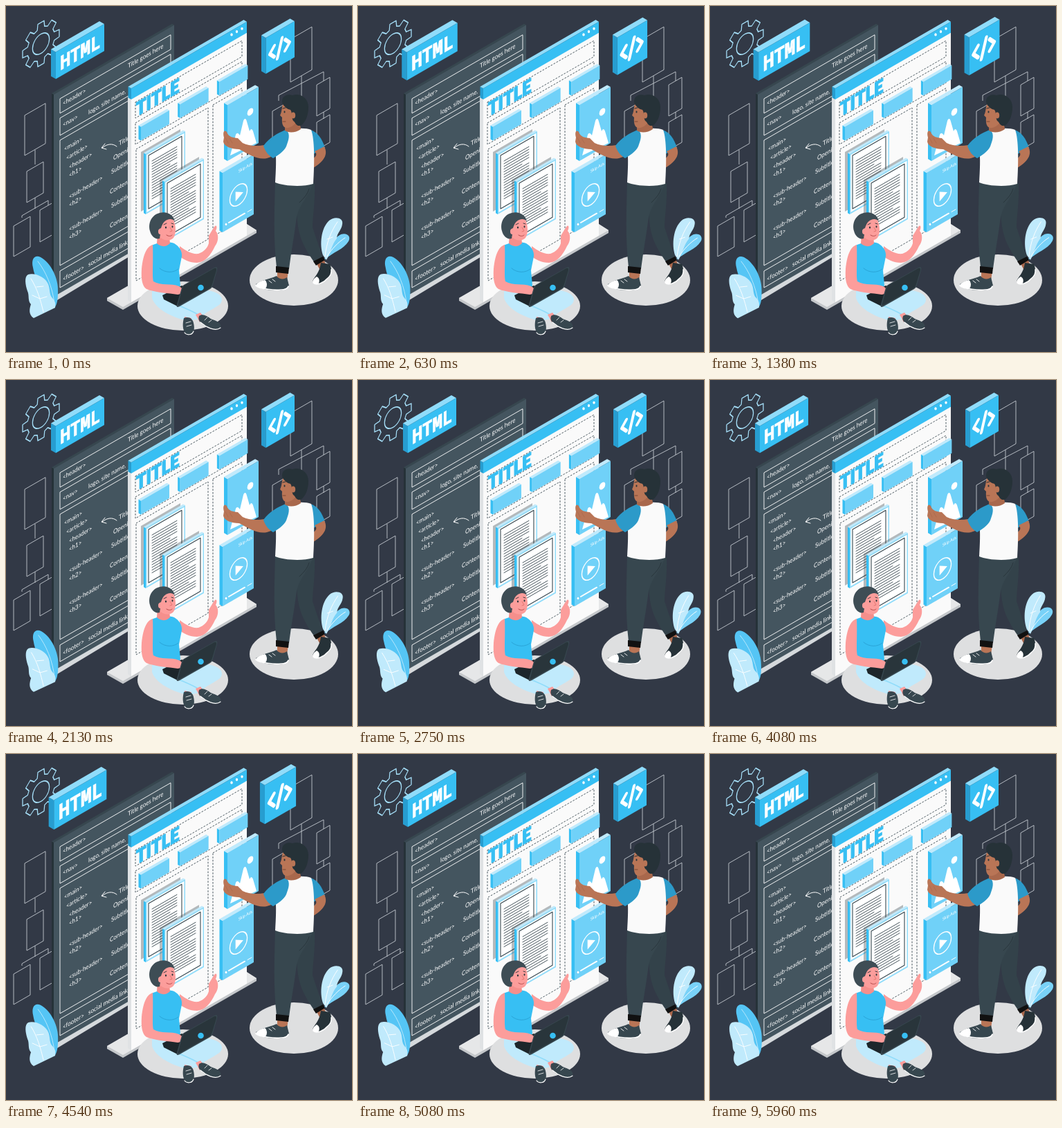
These frames come from a looping animation (500x500 px, 6 s). An HTML page:

```html
<!DOCTYPE html>
<html lang="en">
<head>
<meta charset="utf-8">
<title>Web page planning</title>
<style>
  html, body { margin: 0; width: 100%; height: 100%; overflow: hidden; background: #323946; }
  svg { display: block; width: 100vw; height: 100vh; }
  .note { font: 9.2px Lato, "Open Sans", sans-serif; fill: #fff; }
  .wire { fill: none; stroke: #c3c9d0; stroke-width: .9; }
  .white { fill: none; stroke: #fff; stroke-width: 1; }
  .dash { fill: none; stroke: #37474f; stroke-width: .9; stroke-dasharray: 2.6 2; }
</style>
</head>
<body>
<svg id="stage" viewBox="0 0 500 500"></svg>
<script>
const stage = document.getElementById('stage');
const S = .577;
const BLUE = '#37bff3', SKY = '#70d1f8', PALE = '#90dcfa', DEEP = '#279dd0', ICE = '#c0eafc';
const INK = '#263238', SLATE = '#37474f', PINK = '#fc9d9b', BROWN = '#b97556';

const path = (d, fill, extra = '') => `<path d="${d}" fill="${fill}" ${extra}/>`;
const line = (d, cls, extra = '') => `<path d="${d}" class="${cls}" ${extra}/>`;
const stroke = (d, color, w = 1) =>
  `<path d="${d}" fill="none" stroke="${color}" stroke-width="${w}" stroke-linecap="round" stroke-linejoin="round"/>`;
const ellipse = (x, y, rx, ry, fill) => `<ellipse cx="${x}" cy="${y}" rx="${rx}" ry="${ry}" fill="${fill}"/>`;

// Isometric wall: x runs up to the right, y straight down
const iso = (x, y, inner) => `<g transform="matrix(.866 -.5 0 1 ${x} ${y})">${inner}</g>`;
const quad = (x, y, w, h) => `M${x} ${y}l${w} ${-w * S}v${h}l${-w} ${w * S}z`;
const note = (x, y, s, size = 9.2) => iso(x, y, `<text class="note" style="font-size:${size}px">${s}</text>`);
const box = (x, y, w, h, d, face = BLUE, side = DEEP, top = PALE) =>
  path(`M${x} ${y}l${-d} ${-d * S}v${h}l${d} ${d * S}z`, side) +
  path(`M${x} ${y}l${w} ${-w * S}l${-d} ${-d * S}l${-w} ${w * S}z`, top) +
  path(quad(x, y, w, h), face);

function gear() {
  let d = '';
  for (let i = 0; i < 8; i++) {
    [[-.27, 23], [-.17, 31], [.17, 31], [.27, 23]].forEach(([a, r], k) => {
      const q = i * Math.PI / 4 + a;
      d += `${i || k ? 'L' : 'M'}${(r * Math.sin(q)).toFixed(1)} ${(r * Math.cos(q)).toFixed(1)}`;
    });
  }
  return iso(50.5, 54.5, stroke(d + 'Z', '#a5def7', 1.5) +
    '<circle r="14" fill="none" stroke="#a5def7" stroke-width="1.5"/>');
}

function wires() {
  return line(quad(27, 158, 30, 58) + 'M42 208v21' + quad(30, 239, 24, 45) +
    'M42 277v16M23 306v-3l38 -22v7' + quad(11, 318, 24, 44) + quad(49, 295, 24, 46) +
    quad(411, 48, 31, 62) + 'M427 101v29M394 137v-8l65 -34v13' + quad(449, 114, 19, 45) +
    'M459 153v10' + quad(449, 168, 19, 40) + quad(385, 152, 19, 43), 'wire');
}

function codePanel() {
  const notes = [
    [82, 144, '&lt;header&gt;'], [176, 90, 'Title goes here'], [82, 175, '&lt;nav&gt;'],
    [119, 157, 'logo, site name,'], [84, 210, '&lt;main&gt;'], [87, 223, '&lt;article&gt;'],
    [91, 236, '&lt;header&gt;'], [91, 248, '&lt;h1&gt;'], [91, 279, '&lt;sub-header&gt;'],
    [91, 291, '&lt;h2&gt;'], [91, 326, '&lt;sub-header&gt;'], [91, 338, '&lt;h3&gt;'],
    [163, 202, 'Title'], [155, 223, 'Opening'], [152, 243, 'Subtitle'], [150, 272, 'Content'],
    [152, 292, 'Subtitle'], [150, 321, 'Content'], [82, 398, '&lt;footer&gt;'],
    [119, 377, 'social media links']
  ];
  const frames = [[134, 21], [162, 25], [194, 181], [383, 24]];
  return path('M66 418L180 353v8L69 428L66 426z', '#d5d9dc') +
    box(69, 128, 174, 292, 3, '#44555f', INK, SLATE) +
    line(frames.map(([y, h]) => quad(78, y, 160, h)).join(''), 'white', 'stroke-opacity=".9"') +
    notes.map(n => note(...n)).join('') +
    stroke('M160 203C154 198 146 199 139 205M143 199L138 205L145 207', '#fff');
}

function paper(x, y) {
  let rows = '';
  for (let i = 0; i < 15; i++) {
    const w = i % 6 == 5 ? 26 : 36;
    rows += `M${x + 9} ${y + 10 + i * 3.9}l${w} ${-w * S}`;
  }
  return path(quad(x - 7, y - 3, 57, 86), '#37474f', 'opacity=".36"') +
    box(x, y, 57, 87, 3, PALE, BLUE, ICE) +
    path(quad(x + 1.5, y + 1, 54, 83), '#fff') +
    stroke(quad(x + 4, y + 2, 48, 77), SLATE, 1.1) +
    stroke(rows, SLATE, .9);
}

function pagePanel() {
  const dashes = quad(187, 139, 154, 23) + quad(187, 169, 154, 31) +
    quad(188, 207, 104, 190) + quad(299, 143, 42, 190);
  return path('M146 422L340 310L362 324v4L169 439L146 426z', '#c4c7ca') +
    path('M146 422L340 310L362 324L169 435z', '#e6e7e8') +
    box(181, 134, 167, 294, 5, '#fafafa', '#dfe2e4', '#fff') +
    box(181, 119, 167, 16, 4.5) +
    [326, 333.5, 341].map(x => ellipse(x, 154 - x * S + 75.5, 1.7, 2.1, '#fff')).join('') +
    line(dashes, 'dash') +
    iso(188, 160, `<text style="font:900 27.5px Lato,sans-serif" fill="${BLUE}" stroke="${BLUE}" stroke-width="1.4">TITLE</text>`) +
    [0, 1, 2].map(i => box(195 + i * 56.7, 174.5 - i * 32.5, 41, 20, 3.5, SKY, BLUE, ICE)).join('') +
    paper(202, 214) + paper(229, 254) + photo() + video();
}

function photo() {
  return box(320, 143, 45, 81, 5, SKY, BLUE, ICE) +
    path('M324 216L332 186C334 182 336 184 338 187L343 166C345 161 347 163 348 167L352 181C354 176 356 178 357 181L362 198Z', '#fff') +
    iso(353, 153, '<circle r="5" fill="#fff"/>');
}

function video() {
  return box(313, 241, 45, 86, 4.5, SKY, BLUE, ICE) +
    note(336, 241, 'Skip Ads', 6.2) +
    iso(336, 273, '<circle r="14.5" fill="none" stroke="#fff" stroke-width="1.5"/><path d="M-5-7L8 0L-5 7z" fill="#fff"/>') +
    stroke('M322 313L345 299.7', '#fff', 2) + ellipse(318, 315.5, 1.4, 1.7, '#fff') +
    stroke('M349 297.5L355 294', '#fff', 1);
}

function signs() {
  return `<g class="beat" data-at="103.5 63">${box(72, 66.5, 70, 39, 7)}` +
    iso(78.5, 93, '<text style="font:700 28px \'Noto Sans Mono\',monospace" fill="#fff" stroke="#fff" stroke-width=".7">HTML</text>') + '</g>' +
    `<g class="beat" data-at="393 59">${box(375.5, 46, 41.5, 52, 6.5)}` +
    iso(395.5, 61, stroke('M-9-8L-16.5 0L-9 8M4-13L-4 13M9-8L16.5 0L9 8', '#fff', 5)) + '</g>';
}

function plants() {
  return '<g class="wind" data-at="54 448">' +
    path('M71 435C62 420 43 402 39 378C36 366 41 359 50 363C65 371 76 394 75 412C75 424 74 430 71 435Z', '#55c5f5') +
    stroke('M46 369C57 383 67 405 70 430', ICE, .9) +
    path('M40 451C32 446 34 437 36 431C31 426 34 418 31 412C28 403 26 391 32 388C42 385 57 392 61 402C64 409 62 417 67 422C73 428 71 434 71 436Z', ICE) +
    stroke('M36 394C45 408 50 425 54 442M44 406L54 405M38 418L49 423L59 420', '#fff', .9) + '</g>' +
    '<g class="wind" data-at="463 367">' +
    path('M460 367C465 348 474 335 484 330C493 327 499 333 495 340C488 352 473 355 460 367Z', '#79d2f8') +
    path('M458 360C453 345 455 321 467 310C475 303 488 306 486 315C485 324 478 328 478 336C471 344 469 357 463 367Z', ICE) +
    stroke('M479 312C470 325 463 342 461 362M464 337L472 334M490 335C480 341 470 352 464 362', '#fff', .9) + '</g>';
}

function woman() {
  const hair = '#3e4d55';
  return ellipse(255.5, 433.5, 65.5, 35.5, '#dedfe0') +
    path('M251 347C260 354 269 359 278 358C286 355 291 350 293 343L293 332L301 319C304 315 306 319 303 325C308 330 307 341 302 347C296 360 288 370 276 371C265 371 256 366 251 362Z', PINK) +
    path('M211 406C230 412 280 406 300 413C313 417 315 426 308 432C296 440 285 444 280 452L262 455C240 450 216 438 211 422Z', ICE) +
    stroke('M250 433C262 438 272 442 279 447', PALE, 1.5) +
    path('M274 446L281 443L288 452L280 457ZM258 449L268 451L267 457H258Z', PINK) +
    path('M257 451C264 448 270 452 271 458C273 466 272 474 265 475C256 474 254 463 257 451Z', SLATE) +
    path('M279 448C284 444 290 448 296 452C304 455 312 458 310 464C306 470 298 468 290 464C284 460 276 456 279 448Z', SLATE) +
    stroke('M258 472C261 476 269 476 271 470M281 457C289 464 302 471 310 465', '#fff', 1.2) +
    stroke('M260 458L267 456M261 463L268 461M287 454L291 450M293 457L297 454', '#fff', .8) +
    path('M211 346C220 341 236 340 243 343C250 347 255 354 254 362L250 382C251 395 253 405 251 410C238 414 222 412 210 408C213 390 208 365 211 346Z', BLUE) +
    stroke('M222 379C230 386 242 386 249 380', DEEP, .8) +
    path('M219 329L236 333L237 343C231 349 223 348 218 343Z', '#f58f8c') +
    path('M220 316C225 306 237 304 242 309C246 318 246 329 242 335C236 341 227 339 221 333Z', PINK) +
    path('M244 311C242 301 232 296 222 299C210 302 205 314 208 325C210 333 216 338 222 336L223 330C219 327 220 322 224 321C226 315 228 311 233 309C237 307 241 308 244 311Z', hair) +
    ellipse(223, 326, 3, 4, PINK) +
    ellipse(231, 320, 1.1, 1.5, INK) + ellipse(240.5, 319, 1, 1.4, INK) +
    stroke('M228 316L232 314M239 314L242 315', INK, .9) + stroke('M237 320L240 325L237 326', '#e0736d', .9) +
    stroke('M232 331C235 333 238 333 240 331', '#b34a4a', 1) +
    path('M226 418L254 404L262 408L248 434L228 424Z', '#1d262b') +
    path('M212 345C202 348 198 362 196 380C195 395 197 405 203 409C215 414 235 415 248 417C258 416 258 409 250 405C238 400 224 405 213 398C211 390 213 370 212 345Z', PINK) +
    path('M257 403L301 378C305 376 306 378 305 382L299 403Q298 407 295 409L251 434C247 436 246 435 247 431L254 407Q255 404 257 403Z', SLATE) +
    path('M257 404L301 379C304 378 304 379 304 382L298 402Q297 406 294 408L253 431C249 433 248 433 249 430L255 408Z', '#29353b') +
    ellipse(281.5, 407, 4.3, 4.3, BLUE);
}

function man() {
  const sleeve = '#2c9ac9', shade = '#a9684c';
  return path('M440 179C450 182 457 192 461 205L444 214Z', sleeve) +
    path('M460 203C465 213 462 223 444 234L442 222C449 217 450 214 446 210Z', BROWN) +
    path('M446 367L458 363L464 378L454 382Z', shade) +
    path('M455 371L468 373C472 382 470 390 463 395C457 402 447 404 443 399C443 393 453 388 455 371Z', INK) +
    path('M443 399C443 396 446 393 449 391C453 393 454 398 451 402C447 403 444 402 443 399Z', '#fff') +
    stroke('M444 400C450 404 459 400 464 394C469 390 471 386 470 381', '#fff', 1.5) +
    path('M416 255L446 256C447 285 443 304 443 320L458 364L446 371C435 355 423 338 421 310Z', '#33424a') +
    path('M444 369L458 362L461 367L448 375Z', '#111') +
    path('M392 381L408 382L406 397L392 396Z', BROWN) +
    path('M361 402C369 396 383 394 391 390C394 395 402 396 406 392L409 404C404 411 396 411 388 411C376 410 364 409 361 402Z', SLATE) +
    path('M361 403C364 399 369 397 374 396C378 399 378 406 374 409C368 408 362 407 361 403Z', '#fff') +
    stroke('M361 404C367 409 389 411 397 410C403 410 407 408 408 405', '#fff', 1.7) +
    stroke('M380 397L384 400M385 395L389 398', '#fff', .9) +
    path('M389 252L444 255C438 275 424 286 420 305C417 330 412 355 409 380L391 378C386 335 388 295 389 252Z', SLATE) +
    stroke('M424 284C430 278 436 272 438 264', INK, .8) +
    path('M390 376L409 378L408 387L390 385Z', '#111') +
    path('M404 180C416 176 434 176 441 179C446 192 446 225 444 257C428 262 400 260 389 255C390 238 391 220 389 205Z', '#fafafa') +
    path('M373 201C362 203 350 202 342 198L335 191C328 190 322 190 319 182C315 178 313 183 315 190L314 196C315 203 326 207 337 207C348 213 364 223 377 220L386 217Z', BROWN) +
    stroke('M317 190L321 198M323 191L327 198', shade, .7) +
    path('M404 179C392 184 381 190 372 202C375 212 381 217 386 220C396 214 404 208 406 200C410 190 410 182 404 179Z', sleeve) +
    path('M404 165L424 163L426 178C418 184 407 183 403 180Z', shade) +
    path('M401 139C398 147 399 152 396 158L399 161C398 172 401 177 408 176C416 174 421 168 421 159L420 138Z', BROWN) +
    path('M400 142C396 132 405 126 414 129C425 125 437 133 437 146C437 158 433 168 426 173C418 174 419 168 415 166C412 160 414 154 411 150C406 149 403 146 400 142Z', INK) +
    ellipse(415, 158, 3.2, 4.5, BROWN) + ellipse(402.5, 153, 1, 1.5, INK) +
    stroke('M400 148L404 147', INK, 1) + stroke('M400 167L404 167', '#7d4632', 1);
}

stage.innerHTML = wires() + gear() + codePanel() + signs() + pagePanel() +
  ellipse(416, 396, 64, 37, '#dedfe0') + plants() + woman() + man();

const BEAT = [[0, 1], [.1, 1.1], [.3, 1], [.4, 1], [.5, 1.1], [.6, 1], [1, 1]];
const WIND = [[0, 0], [.25, 2], [.75, -2], [1, 0]];

function tween(keys, p) {
  const i = keys.findIndex(k => k[0] > p);
  const [a, u] = keys[i - 1], [b, v] = keys[i];
  return u + (v - u) * (p - a) / (b - a);
}

function pose(selector, action) {
  for (const el of stage.querySelectorAll(selector)) {
    const [x, y] = el.dataset.at.split(' ');
    el.setAttribute('transform', `translate(${x} ${y}) ${action} translate(${-x} ${-y})`);
  }
}

const start = performance.now();
function draw() {
  const t = (performance.now() - start) % 6000;
  pose('.beat', `scale(${tween(BEAT, t % 3000 / 3000)})`);
  pose('.wind', `rotate(${tween(WIND, t % 1500 / 1500)})`);
  requestAnimationFrame(draw);
}
draw();
</script>
</body>
</html>
```
